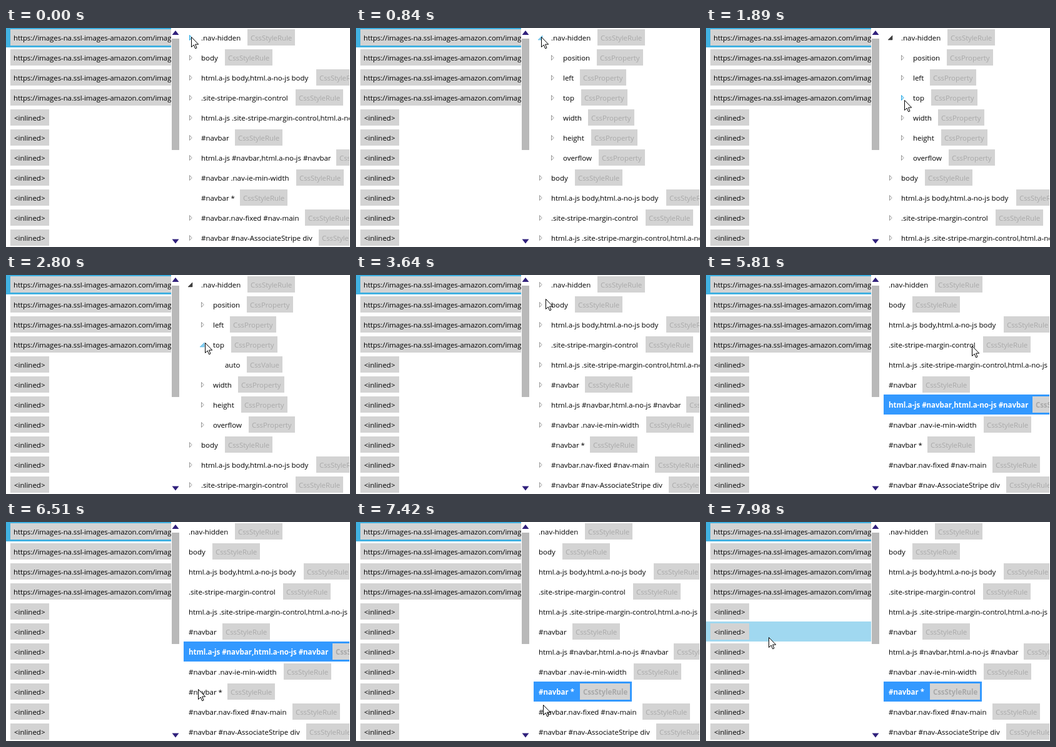
Animation, 550 px wide and 350 px high, one loop 8 s. Source, as an HTML page:

```html
<!DOCTYPE html>
<html lang="en">
<head>
<meta charset="utf-8">
<title>Style rule tree</title>
<style>
  html, body { margin: 0; width: 100%; height: 100%; overflow: hidden; background: #fff; }
  svg { display: block; width: 550px; height: 350px; }
  text { font: 11.5px "Open Sans", "Noto Sans", sans-serif; white-space: pre; }
  .name { letter-spacing: -.03px; }
  .tight { letter-spacing: -.1px; }
  .type { fill: #a9a9a9; }
  .badge { fill: #d3d3d3; }
  .picked text { font-weight: 700; }
  .picked .name { fill: #fff; }
  .shut { fill: #fff; stroke: #989898; }
  .open { fill: #404040; stroke: #262626; stroke-width: .5; }
  .shut.hot { fill: #ccebfb; stroke: #27a9e3; }
  .open.hot { fill: #82cdf0; stroke: #3fa9dc; }
</style>
</head>
<body>
<svg viewBox="0 0 550 350">
  <clipPath id="leftClip"><rect width="264" height="348"/></clipPath>
  <clipPath id="rightClip"><rect x="280" width="269" height="348"/></clipPath>
  <g id="files" clip-path="url(#leftClip)"></g>
  <rect x="265" y="17" width="12" height="178" fill="#b9b9b9"/>
  <path d="M271 4l5.5 7h-11zM271 344.5l-5.5-7h11z" fill="#30207c"/>
  <g id="rules" clip-path="url(#rightClip)"></g>
  <path id="cursor" d="M.5 .5V16.5L4.2 13L6.6 18.8L9 17.8L6.6 12.1H11.7Z" fill="#fff" stroke="#000"/>
</svg>
<script>
const LOOP = 8000, STEP = 70, ROW = 32, SHOWN = 11;
const $ = id => document.getElementById(id);

function add(parent, tag, attrs, text) {
  const el = document.createElementNS('http://www.w3.org/2000/svg', tag);
  for (const k in attrs) el.setAttribute(k, attrs[k]);
  if (text) el.textContent = text;
  parent.appendChild(el);
  return el;
}
const rect = (parent, x, y, width, height, attrs) =>
  add(parent, 'rect', { x, y, width, height, ...attrs });
const label = (parent, x, row, text, cls) =>
  add(parent, 'text', { x, y: row * ROW + 20, class: cls }, text);

// Left list
const url = 'https://images-na.ssl-images-amazon.com/images';
const bars = [];
for (let i = 0; i < SHOWN; i++) {
  const long = i < 4;
  bars.push(rect($('files'), 0, i * ROW - 1, 265, ROW, { fill: 'none' }));
  rect($('files'), 7, i * ROW + 2, long ? 300 : 62, 26, { class: 'badge' });
  label($('files'), long ? 12 : 13, i, long ? url : '<inlined>', long ? 'tight' : '');
}

// Right tree: [name, distance from name to its badge]
const rules = [
  ['.nav-hidden', 74], ['body', 38], ['html.a-js body,html.a-no-js body', 184],
  ['.site-stripe-margin-control', 151],
  ['html.a-js .site-stripe-margin-control,html.a-no-js .site-stripe-margin-control', 420],
  ['#navbar', 54], ['html.a-js #navbar,html.a-no-js #navbar', 216],
  ['#navbar .nav-ie-min-width', 152], ['#navbar *', 62],
  ['#navbar.nav-fixed #nav-main', 166], ['#navbar #nav-AssociateStripe div', 188]
].map(([name, gap]) => ({ name, gap, type: 'CssStyleRule', level: 0, leaf: name === '#navbar *' }));
const props = [
  ['position', 54], ['left', 27], ['top', 29], ['width', 40], ['height', 45], ['overflow', 57]
].map(([name, gap]) => ({ name, gap, type: 'CssProperty', level: 1 }));
const value = { name: 'auto', gap: 35, type: 'CssValue', level: 2, leaf: true };
const badgeWidth = { CssStyleRule: 76, CssProperty: 74, CssValue: 57 };
const pickedGap = { 6: 230, 8: 66 };

function makeScene(items, { flat = false, picked = -1 } = {}) {
  const g = add($('rules'), 'g', { visibility: 'hidden' });
  const arrows = [];
  items.slice(0, SHOWN).forEach((item, i) => {
    const on = i === picked, y = i * ROW;
    const x = (flat ? 292 : 312) + item.level * 19;
    const bx = x + (on ? pickedGap[i] : item.gap);
    const bw = badgeWidth[item.type] + (on ? 4 : 0);
    const row = add(g, 'g', { class: on ? 'picked' : '' });
    if (on) rect(row, 284, y - 1, bx + bw + 3 - 284, ROW, { fill: '#39f' });
    label(row, x, i, item.name, 'name');
    rect(row, bx, y + 2, bw, 26, { class: 'badge' });
    label(row, bx + 5, i, item.type, 'type tight');
    if (flat || item.leaf) return;
    const cls = item.open ? 'open' : 'shut';
    const d = item.open
      ? `M${x - 14} ${y + 12}v7h-7z`
      : `M${x - 18.5} ${y + 11.5}l3.5 4l-3.5 4z`;
    arrows.push({ el: add(row, 'path', { d, class: cls }), cls, x: x - 17, y: y + 15 });
  });
  return { g, arrows };
}

const opened = item => ({ ...item, open: true });
const rest = rules.slice(1);
const shut = makeScene(rules);
const first = makeScene([opened(rules[0]), ...props, ...rest]);
const second = makeScene([
  opened(rules[0]), props[0], props[1], opened(props[2]), value, ...props.slice(3), ...rest
]);
const pickA = makeScene(rules, { flat: true, picked: 6 });
const pickB = makeScene(rules, { flat: true, picked: 8 });

const scenes = [
  [0, shut], [840, first], [2030, second], [3430, shut], [4620, pickA], [6860, pickB]
];

// Pointer path: [ms, x, y]
const path = [
  [0, 296, 14], [1120, 296, 14], [1680, 317, 107], [1820, 319, 116], [1960, 316, 113],
  [2730, 316, 113], [2800, 318, 108], [3360, 297, 15], [3430, 296, 14], [3500, 296, 14],
  [4130, 348, 202], [4200, 348, 202], [4270, 349, 206], [5600, 349, 206],
  [5950, 473, 60], [6230, 408, 180], [6440, 312, 259], [6510, 307, 267],
  [6720, 300, 270], [7070, 300, 270], [7420, 299, 292], [7490, 288, 296],
  [7910, 100, 187], [7980, 100, 184], [8000, 100, 184]
];

const same = (a, b) => a[1] === b[1] && a[2] === b[2];
function slope(i, axis) {
  const a = path[i - 1], b = path[i], c = path[i + 1];
  if (!a || !c || same(a, b) || same(b, c)) return 0;
  return (c[axis] - a[axis]) / (c[0] - a[0]);
}
function pointer(t) {
  let i = 0;
  while (i < path.length - 2 && path[i + 1][0] <= t) i++;
  const a = path[i], b = path[i + 1], span = b[0] - a[0];
  const u = (t - a[0]) / span, v = 1 - u;
  return [1, 2].map(k => Math.round(
    v * v * (1 + 2 * u) * a[k] + u * u * (3 - 2 * u) * b[k] +
    span * u * v * (v * slope(i, k) - u * slope(i + 1, k))));
}

function draw(ms) {
  const t = Math.floor(ms % LOOP / STEP) * STEP;
  const [x, y] = pointer(t);
  const scene = scenes.filter(s => s[0] <= t).pop()[1];
  for (const [, s] of scenes) s.g.setAttribute('visibility', s === scene ? 'visible' : 'hidden');
  for (const a of scene.arrows) {
    const hot = Math.abs(x - a.x) < 8 && Math.abs(y - a.y) < 9;
    a.el.setAttribute('class', a.cls + (hot ? ' hot' : ''));
  }
  const over = x < 265 ? Math.floor((y + 1) / ROW) : -1;
  bars.forEach((bar, i) =>
    bar.setAttribute('fill', i === 0 ? '#41b1e1' : i === over ? '#a0d8f0' : 'none'));
  $('cursor').setAttribute('transform', `translate(${x} ${y})`);
}

const start = performance.now();
function tick() {
  draw(performance.now() - start);
  requestAnimationFrame(tick);
}
tick();
</script>
</body>
</html>
```
